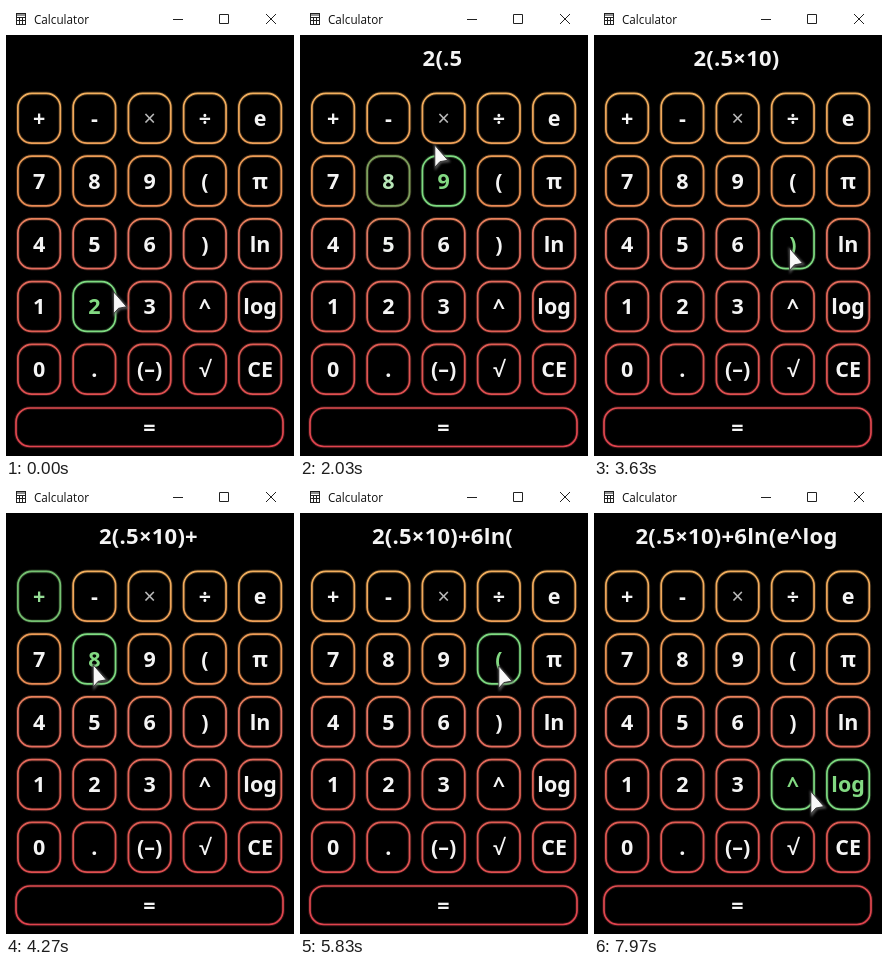
Animation, 288 px wide and 450 px high, one loop 8 s. Source, as an HTML page:

```html
<!DOCTYPE html>
<html lang="en">
<head>
<meta charset="utf-8">
<title>Calculator</title>
<style>
html, body { margin: 0; width: 100%; height: 100%; overflow: hidden; background: #000; }
svg { display: block; width: 288px; height: 450px; }
text { font: 600 21.5px "Noto Sans", "Open Sans", sans-serif; text-anchor: middle; fill: #f4f4f4; }
#display { font-size: 22px; letter-spacing: .25px; }
.key { --ink: #f4f4f4; --lit: 0; }
.key rect { fill: none; stroke: url(#warm); stroke-width: 1.7; opacity: calc(1 - var(--lit)); }
.key .glow { stroke-width: 3.6; stroke-opacity: .22; }
.key .green { stroke: #7fdc82; opacity: var(--lit); }
.key text { fill: color-mix(in srgb, #82d982 calc(var(--lit) * 100%), var(--ink)); }
.key.dim { --ink: #b8b8b8; }
.key.dim text { font-weight: 400; }
#title { font: 11.7px "Open Sans", sans-serif; text-anchor: start; fill: #111; }
.chrome { fill: none; stroke: #222; }
</style>
</head>
<body>
<svg viewBox="0 0 288 450">
  <defs>
    <linearGradient id="warm" gradientUnits="userSpaceOnUse" x1="0" y1="87" x2="0" y2="441">
      <stop offset="0" stop-color="#f3b05e"/>
      <stop offset=".3" stop-color="#ea9052"/>
      <stop offset=".4" stop-color="#e87664"/>
      <stop offset=".65" stop-color="#e06054"/>
      <stop offset="1" stop-color="#e0434e"/>
    </linearGradient>
    <filter id="soft" x="-50%" y="-50%" width="200%" height="200%"><feGaussianBlur stdDeviation="1"/></filter>
  </defs>
  <rect width="288" height="450"/>
  <rect width="288" height="29" fill="#fff"/>
  <g class="chrome">
    <rect x="10.5" y="7.5" width="9" height="11"/>
    <path d="M10 9h10M10 11.5h10M10 14.5h10M13.5 11v8M16.5 11v8"/>
    <path d="M167 13.5h10M213.5 8.5h9v9h-9zM260 8l10 10M270 8l-10 10"/>
  </g>
  <text id="title" x="28" y="17.5">Calculator</text>
  <text id="display" x="142.500" y="60"></text>
  <g id="keys"></g>
  <g id="cursor">
    <path d="M0 1L1 23L6 17L14 16Z" fill="#777" stroke="#777" stroke-width="2" opacity=".7" filter="url(#soft)"/>
    <path d="M0 0V22L5 16.500L13 15Z" fill="#f8f8f8" stroke="#222" stroke-width=".8"/>
  </g>
</svg>
<script>
const LOOP = 8000, HOLD = 60, FADE = 250, STEP = 5;
const rows = ["+ - × ÷ e", "7 8 9 ( π", "4 5 6 ) ln", "1 2 3 ^ log", "0 . (–) √ CE"];

// key and time of each press; "hover" stops type nothing
const stops = [
  ["6", -255, "hover"], ["2", 190, "hover"], ["2", 340], ["(", 680], [".", 1060],
  ["5", 1440], ["×", 2270], ["1", 2570], ["0", 2870], [")", 3540], ["+", 4030],
  ["6", 4517], ["ln", 5050], ["(", 5770], ["e", 6125], ["(", 6520, "hover"],
  ["^", 7300], ["log", 7835], ["^", 8078, "hover"]
].map(([label, time, mode]) => ({ label, time, types: mode !== "hover" }));

const keysBox = document.getElementById("keys");
const display = document.getElementById("display");
const cursor = document.getElementById("cursor");
const keys = {};

function addKey(label, x, y, w, h) {
  const box = `x="${x}" y="${y}" width="${w}" height="${h}" rx="14"`;
  const cx = x + w / 2, cy = y + h / 2;
  keysBox.insertAdjacentHTML("beforeend",
    `<g class="key ${label === "×" ? "dim" : ""}">
      <rect class="glow" ${box}/><rect ${box}/>
      <rect class="glow green" ${box}/><rect class="green" ${box}/>
      <text x="${cx}" y="${cy + 7.7}">${label}</text></g>`);
  keys[label] = { x, y, w, h, cx, cy, node: keysBox.lastElementChild, visits: [] };
}

rows.forEach((row, j) => row.split(" ").forEach((label, i) =>
  addKey(label, 11.9 + i * 55.25, 87.4 + j * 62.75, 42.4, 49.8)));
addKey("=", 10, 402, 267, 38.5);

const smooth = u => u * u * (3 - 2 * u);

// The pointer rests HOLD ms around each press and glides in between.
function pointer(t) {
  const i = Math.max(1, stops.findIndex(s => s.time > t));
  const a = stops[i - 1], b = stops[i];
  const u = (t - a.time - HOLD) / (b.time - a.time - 2 * HOLD);
  const e = smooth(Math.min(1, Math.max(0, u)));
  const from = keys[a.label], to = keys[b.label];
  return [from.cx + (to.cx - from.cx) * e, from.cy + (to.cy - from.cy) * e + 7];
}

const inside = (k, x, y) => x > k.x && x < k.x + k.w && y > k.y && y < k.y + k.h;

// The last key touched stays lit until another one is reached.
let current;
for (let t = 0; t <= LOOP; t += STEP) {
  const [x, y] = pointer(t);
  const hit = Object.values(keys).find(k => inside(k, x, y));
  if (hit && hit !== current) {
    current = hit;
    hit.visits.unshift({ from: t, to: t });
  }
  if (current) current.visits[0].to = t + STEP;
}

function glow(key, t) {
  const visit = key.visits.find(v => v.from <= t);
  return visit ? Math.max(0, 1 - Math.max(0, t - visit.to) / FADE) : 0;
}

function draw(t) {
  const [x, y] = pointer(t);
  cursor.setAttribute("transform", `translate(${x.toFixed(2)} ${y.toFixed(2)})`);
  display.textContent = stops.filter(s => s.types && s.time <= t).map(s => s.label).join("");
  for (const k of Object.values(keys)) k.node.style.setProperty("--lit", glow(k, t).toFixed(3));
}

const start = performance.now();
function tick(now) {
  draw(Math.max(0, now - start) % LOOP);
  requestAnimationFrame(tick);
}
draw(0);
requestAnimationFrame(tick);
</script>
</body>
</html>
```
